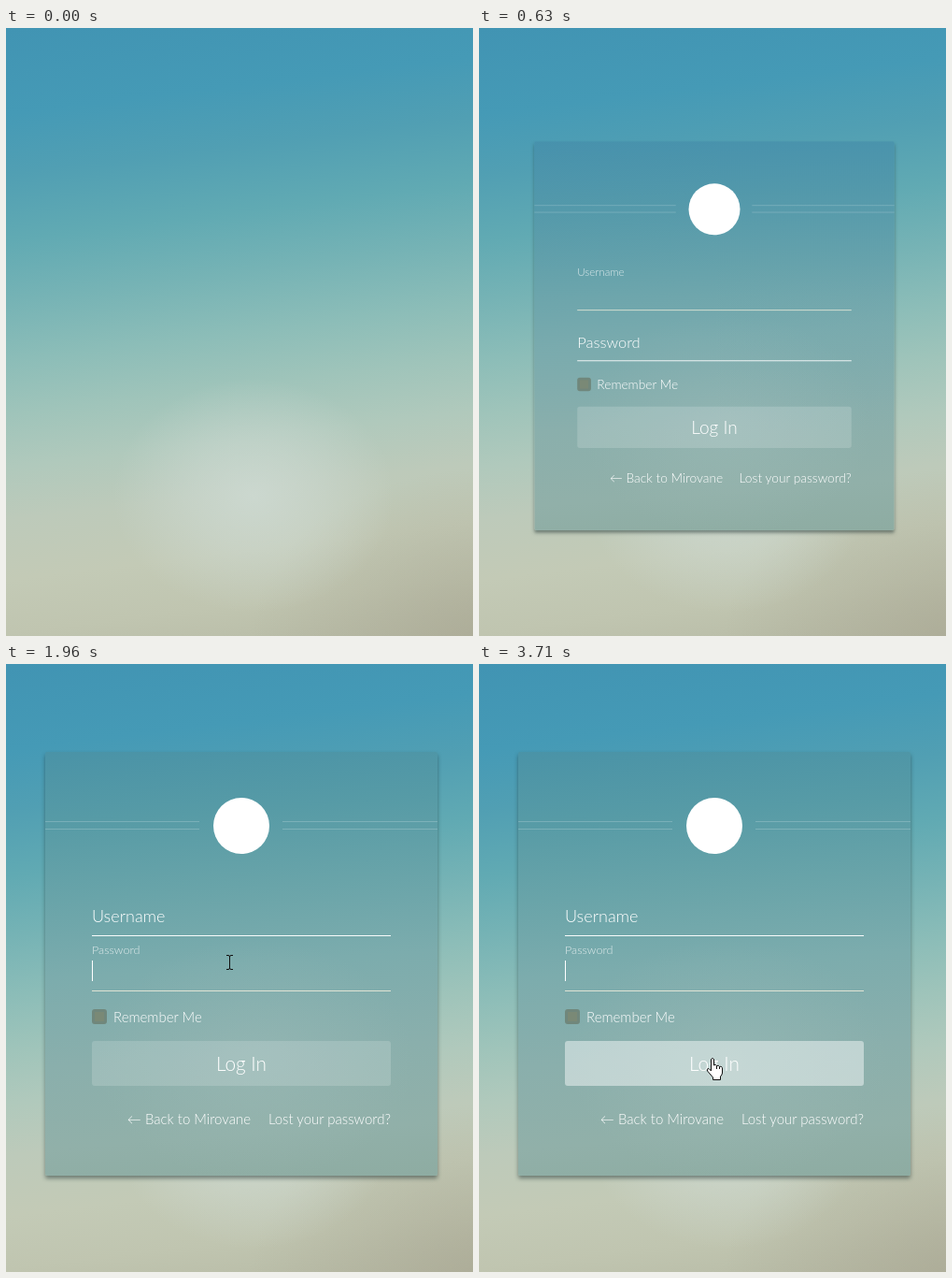
An HTML page for the animation above (3.92 s loop, 500 px wide and 650 px high).

```html
<!DOCTYPE html>
<html lang="en">
<head>
<meta charset="utf-8">
<title>Login card</title>
<style>
  html, body { margin: 0; width: 100%; height: 100%; overflow: hidden; }
  #stage {
    position: relative; width: 500px; height: 650px; overflow: hidden;
    background:
      radial-gradient(ellipse 150px 125px at 265px 500px, rgba(208,220,214,.75), rgba(208,220,214,.45) 45%, rgba(208,220,214,0)),
      radial-gradient(ellipse 260px 190px at 520px 660px, rgba(168,166,146,.7), rgba(168,166,146,0)),
      linear-gradient(173deg, #4194b3 0%, #459ab6 13%, #519fb3 22%, #61aab3 32%, #76b3b5 41%,
        #8cbdb8 50%, #9fc4ba 58%, #b0c9bc 66%, #bdcaba 74%, #c3cab6 83%, #c0c5b0 91%, #b7baa5 100%);
  }
  #card {
    position: absolute; left: 42px; top: 94px; width: 420px; height: 453px;
    border-radius: 2px; box-shadow: 0 3px 4px rgba(30,50,50,.5);
    background:
      radial-gradient(ellipse 170px 130px at 225px 330px, rgba(165,192,188,.35), rgba(165,192,188,0)),
      linear-gradient(176deg, #4a93a7 0%, #579ba6 16%, #69a4a9 33%, #7cacad 50%, #8aafac 70%, #91b0a9 88%, #8eaca2 100%);
  }
  #tint {
    position: absolute; inset: 0; border-radius: 2px;
    background: linear-gradient(rgba(66,143,182,.65), rgba(100,160,180,.3) 40%, rgba(120,160,170,0) 75%);
  }
  svg { position: absolute; left: 0; top: 0; overflow: visible; }
  text { font-family: Lato, "Open Sans", sans-serif; font-weight: 300; fill: #fff; }
</style>
</head>
<body>
<div id="stage">
  <div id="card">
    <div id="tint"></div>
    <svg width="420" height="453" viewBox="42 94 420 453">
      <path d="M42 168.5H207M296 168.5H462M42 176.5H207M296 176.5H462" stroke="#fff" stroke-opacity=".2"/>
      <circle cx="252" cy="173" r="30" fill="#fff"/>
      <g id="user"><text font-size="18">Username</text></g>
      <g id="pass"><text font-size="18">Password</text></g>
      <path id="userLine" d="M92 290.5H412"/>
      <path id="passLine" d="M92 349.5H412"/>
      <path id="caret" stroke="#fff"/>
      <rect x="92" y="369" width="16" height="16" rx="3" fill="#70877c"/>
      <rect x="95" y="372" width="10" height="10" fill="#7a8976"/>
      <text x="115" y="383" font-size="15">Remember Me</text>
      <rect id="button" x="92" y="403" width="320" height="48" rx="3" fill="#fff"/>
      <text x="252" y="435" font-size="20.8" text-anchor="middle">Log In</text>
      <text x="262" y="492" font-size="15" text-anchor="end">← Back to Mirovane</text>
      <text x="412" y="492" font-size="15" text-anchor="end">Lost your password?</text>
    </svg>
  </div>
  <svg width="500" height="650">
    <g id="pointer">
      <path id="arrow" d="M0 0V16L4 12.5L6.5 18L9 17L6.5 11.5H11.5Z" fill="#fff" stroke="#000"/>
      <path id="beam" d="M-3 -7.5H-1Q0.5 -7.5 .5 -6Q.5 -7.5 2 -7.5H4M.5 -6.5V6.5M-3 7.5H-1Q.5 7.5 .5 6Q.5 7.5 2 7.5H4" fill="none" stroke="#111"/>
      <path id="hand" d="M-1.5 1.5Q0 -.5 1.5 1.5V8Q3.5 6.5 4.5 8.5Q6.5 7.5 7.5 9.5Q10.5 8.5 10.5 12V16Q10.5 18 8.5 20V23.5H.5V21L-5.5 14Q-6.5 11.5 -4 11.5L-1.5 14ZM4.5 8.5V12M7.5 9.5V12" fill="#fff" stroke="#111" stroke-linejoin="round"/>
    </g>
  </svg>
</div>
<script>
const LOOP = 3920, STEP = 70;
const el = id => document.getElementById(id);
const mix = (a, b, p) => a + (b - a) * p;
const clamp = v => Math.min(1, Math.max(0, v));
const span = (t, from, to) => clamp((t - from) / (to - from));

function bezier(x1, y1, x2, y2) {
  const at = (a, b, u) => 3 * a * u * (1 - u) ** 2 + 3 * b * u * u * (1 - u) + u ** 3;
  return x => {
    if (x <= 0 || x >= 1) return clamp(x);
    let lo = 0, hi = 1;
    for (let i = 0; i < 24; i++) {
      const mid = (lo + hi) / 2;
      if (at(x1, x2, mid) < x) lo = mid; else hi = mid;
    }
    return at(y1, y2, lo);
  };
}
const dropIn = bezier(.55, .055, .675, .19);
const settle = bezier(.175, .885, .32, 1);
const ease = bezier(.25, .1, .25, 1);

// time, x, y of the pointer hotspot
const path = [
  [1120, 428, 291], [1190, 398, 297], [1330, 316, 310], [1470, 257, 315],
  [1610, 241, 316], [1750, 239, 317], [1960, 239, 319], [2170, 245, 333],
  [2310, 249, 369], [2450, 250, 405], [2590, 250, 421]
];
// caret on, caret off, top
const blinks = [[980, 1470, 258], [1750, 2240, 317], [2730, 3220, 317], [3710, LOOP, 317]];

function drawCard(t) {
  const falling = t < 518;
  const p = falling ? dropIn((t + 20) / 540) : settle((t - 514) / 360);
  const scale = falling ? mix(.1, .475, p) : mix(.475, 1, p);
  const shift = falling ? mix(-1000, 60, p) : mix(60, 0, p);
  const card = el('card').style;
  card.opacity = t < STEP ? 0 : falling ? p : 1;
  card.transform = scale === 1 ? 'none' : `scale(${scale}) translateY(${shift}px)`;
  el('tint').style.opacity = 1 - span(t, 560, 720);
}

function drawLabel(id, low, high, raised) {
  const g = el(id);
  g.setAttribute('transform', `translate(92 ${mix(low, high, raised)}) scale(${mix(1, .7, raised)})`);
  g.setAttribute('opacity', mix(1, .78, raised));
}

function drawLine(id, focus) {
  const line = el(id);
  line.setAttribute('stroke', `rgb(255,${mix(255, 246, focus)},${mix(255, 226, focus)})`);
  line.setAttribute('stroke-opacity', mix(.95, .75, focus));
}

function drawForm(t) {
  const swap = ease(span(t, 1640, 1960));
  drawLabel('user', 275.5, 251, 1 - swap);
  drawLabel('pass', 334, 310, swap);
  drawLine('userLine', 1 - swap);
  drawLine('passLine', swap);
  const blink = blinks.find(([on, off]) => t >= on && t < off);
  el('caret').setAttribute('d', blink ? `M92.5 ${blink[2]}v22` : '');
  el('button').setAttribute('fill-opacity', mix(.16, .45, ease(span(t, 2450, 2730))));
}

function drawPointer(t) {
  el('pointer').style.display = t < path[0][0] ? 'none' : '';
  let i = 0;
  while (i < path.length - 2 && t >= path[i + 1][0]) i++;
  const [a, b] = [path[i], path[i + 1]];
  const p = span(t, a[0], b[0]);
  const x = Math.round(mix(a[1], b[1], p)), y = Math.round(mix(a[2], b[2], p));
  el('pointer').setAttribute('transform', `translate(${x} ${y})`);
  const kind = y >= 403 ? 'hand' : x > 412 || y > 350 ? 'arrow' : 'beam';
  for (const id of ['arrow', 'beam', 'hand']) el(id).style.display = id === kind ? '' : 'none';
}

const start = performance.now();
function frame() {
  const t = Math.floor((performance.now() - start) % LOOP / STEP) * STEP;
  drawCard(t);
  drawForm(t);
  drawPointer(t);
  requestAnimationFrame(frame);
}
frame();
</script>
</body>
</html>
```
